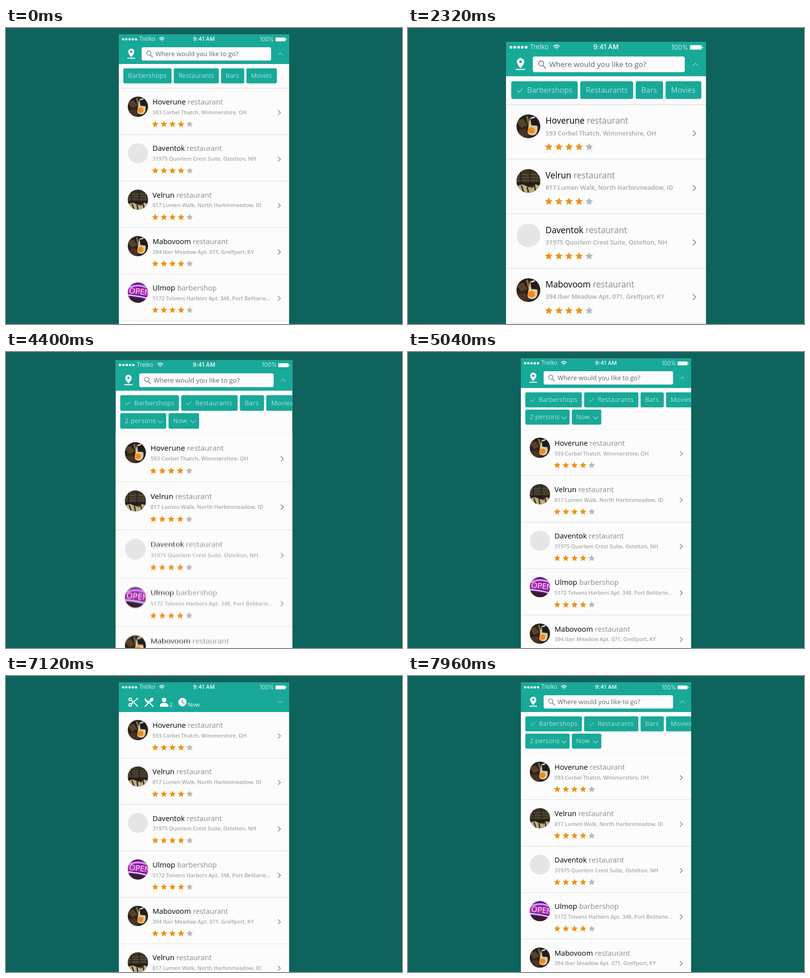
Recreate the animation shown at these times as an HTML page. Size 800 by 600 pixels, loop 8000 ms.

```html
<!DOCTYPE html>
<html lang="en">
<head>
<meta charset="utf-8">
<title>Place finder</title>
<style>
  html, body { margin: 0; height: 100%; overflow: hidden; background: #0e645c; }
  svg { display: block; width: 100vw; height: 100vh; }
  text { font-family: "Open Sans", "Noto Sans", sans-serif; }
  .bar { font: 300 11px Inter, "Open Sans", sans-serif; fill: #fff; letter-spacing: .2px; }
  .title { font-size: 14.67px; fill: #000; }
  .title tspan { fill: #8b8b8b; }
  .addr { font-size: 10.7px; font-weight: 600; fill: #a8a8a8; }
  .chip { font-size: 12.84px; font-weight: 300; fill: #fff; letter-spacing: .35px; }
  .line { fill: none; stroke-linecap: round; stroke-linejoin: round; }
</style>
</head>
<body>
<svg viewBox="0 0 800 600">
  <defs>
    <clipPath id="phoneClip"><rect x="228" y="13.5" width="344" height="620"/></clipPath>
    <clipPath id="headClip"><rect x="228" y="13.5" width="344" height="59.5"/></clipPath>
    <clipPath id="round"><circle r="20.5"/></clipPath>
    <filter id="soft" x="-20%" y="-20%" width="140%" height="140%"><feGaussianBlur stdDeviation=".9"/></filter>
    <g id="food">
      <rect x="-21" y="-21" width="42" height="42" fill="#28211c"/>
      <path d="M-21-9L-9-13-1-2-12 3z" fill="#5a4029"/>
      <path d="M-21 8L-6 4 2 17-8 21z" fill="#4a3322"/>
      <path d="M-4-17l3-1 4 14-3 2z" fill="#8a6a45"/>
      <path d="M3-15c7-3 11 5 12 13 2 8 0 15-5 17-8 2-13-2-11-9z" fill="#dcc79c"/>
      <path d="M3-17h12l1 16-11-1z" fill="#1d1d20"/>
      <path d="M4-14l7-2" stroke="#e8e2d4" stroke-width="2.5"/>
      <ellipse cx="5" cy="7" rx="6" ry="5.5" fill="#f08a1c"/>
    </g>
    <g id="bar">
      <rect x="-21" y="-21" width="42" height="42" fill="#3b3327"/>
      <path d="M-17-11h35M-18-6h36M-19-1h37" stroke="#776a50" stroke-width="1.3" stroke-dasharray="3 1.5"/>
      <path d="M-21 3h42v7h-42z" fill="#211c16"/>
      <path d="M-13-20v27M3-20v23" stroke="#272119" stroke-width="2"/>
      <path d="M-21 9L-10 6 2 11 13 6 21 9V21h-42z" fill="#c0ad83"/>
      <path d="M-12 8l4 12M-2 10l2 10M5 12l5-5 3 13" stroke="#332a1d" stroke-width="2.5" fill="none"/>
    </g>
    <g id="plain"><circle r="20.5" fill="#e6e6e6"/></g>
    <g id="neon">
      <rect x="-21" y="-21" width="42" height="42" fill="#5b1d92"/>
      <path d="M-21-9Q0-19 21-9" stroke="#e08af0" stroke-width="4" fill="none"/>
      <path d="M-21-6Q0-13 21-6V8Q0 2-21 2z" fill="#b32fb0"/>
      <path d="M-21 5Q0 6 21 12" stroke="#f0d8ff" stroke-width="2.5" fill="none"/>
      <path d="M-21 9Q0 10 21 16V21h-42z" fill="#3b1c22"/>
      <text x="-18" y="3" font-size="16" fill="#ffe6fa" transform="rotate(6)">OPEN</text>
    </g>
  </defs>
  <rect width="800" height="600" fill="#0e645c"/>
  <g id="scene">
    <g clip-path="url(#phoneClip)">
      <rect x="228" y="13" width="344" height="630" fill="#fcfcfc"/>
      <g id="rows"></g>
      <rect id="edge" x="228" width="344" height="1.1"/>
      <g id="panel"></g>
      <rect x="228" y="13" width="344" height="60" fill="#18a999"/>
      <g clip-path="url(#headClip)">
        <g id="search">
          <path d="M253 41.8a6.3 6.3 0 0 0-6.3 6.3c0 4.6 6.3 11 6.3 11s6.3-6.4 6.3-11a6.3 6.3 0 0 0-6.3-6.3zm0 4a2.3 2.3 0 1 1 0 4.6a2.3 2.3 0 0 1 0-4.6z" fill="#fff"/>
          <rect x="245" y="60.3" width="16" height="1.9" fill="#fff"/>
          <rect x="274" y="39" width="261.5" height="27" rx="3.5" fill="#fcfcfc"/>
          <path class="line" d="M292 55l4 4" stroke="#777" stroke-width="1.5"/>
          <circle cx="288.5" cy="51" r="4.3" fill="none" stroke="#777" stroke-width="1.3"/>
          <text x="302" y="57" font-size="12.84" fill="#666">Where would you like to go?</text>
        </g>
        <g id="icons" fill="#fff">
          <g>
            <g class="line" stroke="#fff" stroke-width="2">
              <circle cx="251" cy="47.5" r="2.7"/><circle cx="251" cy="58.5" r="2.7"/>
              <path d="M253.5 49.5L266 61.5M253.5 56.5L266 45"/>
            </g>
          </g>
          <g>
            <path class="line" d="M281 61.5L292 50.5M297 61.5L286 50.5" stroke="#fff" stroke-width="2.3"/>
            <ellipse cx="293.8" cy="48.3" rx="3.3" ry="4.8" transform="rotate(45 293.8 48.3)"/>
            <path d="M280.5 44.5l9 8.5-3 2.5q-8-5-6-11z"/>
          </g>
          <g>
            <circle cx="319.5" cy="48.5" r="4.6"/>
            <path d="M311 62.3v-2.5c0-4 5-5.3 8.5-5.3s8.5 1.3 8.5 5.3v2.5z"/>
            <text x="330" y="62" font-size="11">2</text>
          </g>
          <g>
            <circle cx="356.5" cy="53" r="8.4"/>
            <path class="line" d="M356 48.3v5l3.8 2.4" stroke="#18a999" stroke-width="1.5"/>
            <text x="367.5" y="62" font-size="11.3">Now</text>
          </g>
        </g>
      </g>
      <path id="arrow" class="line" d="M-4.5-2.2L0 2.2 4.5-2.2" stroke="#8ad6cd" stroke-width="1.1"/>
      <g id="dots" fill="#fff"></g>
      <text class="bar" x="269" y="26.3">Trelko</text>
      <g class="line" stroke="#fff" stroke-width="1.5">
        <path d="M309.8 21.2q5-4.2 10 0M311.8 23.7q3-2.5 6 0"/>
        <circle cx="314.8" cy="25.6" r=".6" fill="#fff" stroke-width=".8"/>
      </g>
      <text class="bar" x="400" y="26.3" text-anchor="middle" style="font-weight:500">9:41 AM</text>
      <text class="bar" x="541.5" y="26.8" text-anchor="end">100%</text>
      <rect x="544.5" y="19.3" width="20" height="7.8" rx="1.5" fill="#fff"/>
      <rect x="565.3" y="21.7" width="1.4" height="3" rx=".6" fill="#fff"/>
    </g>
    <circle id="finger" r="23" fill="#484848" filter="url(#soft)"/>
  </g>
</svg>
<script>
const $ = id => document.getElementById(id);
const LOOP = 8000, PITCH = 94.2, ORIGIN = { x: 400, y: -69 };

const clamp = v => Math.max(0, Math.min(1, v));
const ease = (t, start, len) => {
  const p = clamp((t - start) / len);
  return p * p * (3 - 2 * p);
};
const mix = (a, b, p) => a + (b - a) * p;
const mixRgb = (a, b, p) => `rgb(${a.map((v, i) => Math.round(mix(v, b[i], p)))})`;

// Motion curves
const zoom = t => 1 + .1744 * (ease(t, 1040, 360) - ease(t, 4150, 360));
const barbers = t => ease(t, 1640, 260);
const diners = t => ease(t, 2840, 260);
const swapA = t => ease(t, 1760, 400);
const swapB = t => ease(t, 2960, 400);
const extra = t => ease(t, 3450, 350);
const open = t => 1 - ease(t, 5250, 320) + ease(t, 7350, 320);
const listTop = t => 72 + open(t) * (50 + 34.5 * extra(t));

const places = [
  { name: "Hoverune", kind: "restaurant", addr: "593 Corbel Thatch, Wimmershire, OH", pic: "food", slot: () => 0 },
  { name: "Daventok", kind: "restaurant", addr: "31975 Quorlem Crest Suite, Ostelton, NH", pic: "plain", slot: t => 1 + swapA(t) },
  { name: "Velrun", kind: "restaurant", addr: "817 Lumen Walk, North Harbinmeadow, ID", pic: "bar", slot: t => 2 - swapA(t) },
  { name: "Mabovoom", kind: "restaurant", addr: "394 Iber Meadow Apt. 071, Grelfport, KY", pic: "food", slot: t => 3 + swapB(t) },
  { name: "Ulmop", kind: "barbershop", addr: "5172 Tolvens Harbors Apt. 348, Port Belitarie...", pic: "neon", slot: t => 4 - swapB(t) },
  { name: "Velrun", kind: "restaurant", addr: "817 Lumen Walk, North Harbinmeadow, ID", pic: "bar", slot: () => 5 }
];

const star = Array.from({ length: 10 }, (_, i) => {
  const r = i % 2 ? 3.3 : 7, a = i * Math.PI / 5;
  return `${(r * Math.sin(a)).toFixed(2)},${(-r * Math.cos(a)).toFixed(2)}`;
}).join(" ");
const stars = [0, 1, 2, 3, 4].map(i =>
  `<polygon points="${star}" transform="translate(${301.5 + 17.4 * i} 73.2)" fill="${i < 4 ? "#ee9318" : "#b9b9b9"}"/>`).join("");

$("rows").innerHTML = places.map((p, i) => `
  <filter id="smear${i}" x="-2%" y="-10%" width="104%" height="120%"><feGaussianBlur/></filter>
  <g class="row">
    <rect x="228" y=".6" width="344" height="${PITCH - .6}" fill="#fcfcfc"/>
    <g transform="translate(266.5 37.5)" clip-path="url(#round)"><use href="#${p.pic}"/></g>
    <text class="title" x="296" y="33.3">${p.name} <tspan>${p.kind}</tspan></text>
    <text class="addr" x="296" y="53">${p.addr}</text>
    ${stars}
    <path class="line" d="M549.8 45l4.6 4.5-4.6 4.5" stroke="#8c8c8c" stroke-width="1.5"/>
    <rect x="228" y="${PITCH - .5}" width="344" height="1.1" fill="#dedede"/>
  </g>`).join("");
const rows = [...document.querySelectorAll(".row")];
const smears = [...document.querySelectorAll("#rows feGaussianBlur")];

const chips = [
  { label: "Barbershops", w: 97.5, grow: 16.8, on: barbers },
  { label: "Restaurants", w: 91, grow: 18.7, on: diners },
  { label: "Bars", w: 47, grow: 0, on: () => 0 },
  { label: "Movies", w: 61.5, grow: 0, on: () => 0 }
];
const menus = [{ label: "2 persons", x: 237, w: 89.5 }, { label: "Now", x: 331, w: 59.5 }];

$("panel").innerHTML = chips.map(c => `
  <g class="tag" fill="#18a999"><rect y="81.8" width="${c.w}" height="30.4" rx="3"/>
    <path class="line" d="M10.5 97.5l3 3 6-6.5" stroke="#fff" stroke-width="1"/>
    <text class="chip" y="101.2">${c.label}</text></g>`).join("") +
  `<g id="menus">` + menus.map(m => `
  <g transform="translate(${m.x})"><rect y="116.8" width="${m.w}" height="30.4" rx="3"/>
    <text class="chip" x="9" y="136.2">${m.label}</text>
    <path class="line" d="M${m.w - 16} 131.5l4.5 4.3 4.5-4.3" stroke="#a5e2db" stroke-width="1.1"/></g>`).join("") + `</g>`;
const tags = [...document.querySelectorAll(".tag")];

$("dots").innerHTML = [0, 1, 2, 3, 4].map(i => `<circle cx="${236.6 + 6.5 * i}" cy="23" r="2.4"/>`).join("");

const dragY = t => 294 + 84.5 * open(t);
const touches = [
  { from: 1480, to: 1780, x: 286, y: () => 97 },
  { from: 2680, to: 2980, x: 400, y: () => 97 },
  { from: 5080, to: 5720, x: 395, y: dragY },
  { from: 7200, to: 7840, x: 395, y: dragY }
];

// Rows smear vertically with the speed of the zoom
function drawRows(t) {
  const dz = Math.abs(zoom(t) - zoom(t - 10));
  places.forEach((p, i) => {
    const y = listTop(t) + p.slot(t) * PITCH;
    const blur = .3 * dz * (y + 40 - ORIGIN.y);
    rows[i].setAttribute("transform", `translate(0 ${y})`);
    smears[i].setAttribute("stdDeviation", `0 ${blur.toFixed(2)}`);
    if (blur > .15) rows[i].setAttribute("filter", `url(#smear${i})`);
    else rows[i].removeAttribute("filter");
  });
}

function drawPanel(t, o, e) {
  $("edge").setAttribute("y", listTop(t) - .5);
  $("edge").setAttribute("fill", mixRgb([220, 220, 220], [241, 241, 241], e));
  $("panel").setAttribute("transform", `translate(0 ${(o - 1) * 84.5})`);
  let x = 237;
  chips.forEach((c, i) => {
    const on = c.on(t), w = c.w + c.grow * on, [box, tick, label] = tags[i].children;
    tags[i].setAttribute("transform", `translate(${x})`);
    box.setAttribute("width", w);
    tick.setAttribute("opacity", .65 * on);
    label.setAttribute("x", 9.5 + 18 * on);
    x += w + 4.4;
  });
  $("menus").setAttribute("fill", mixRgb([150, 245, 236], [24, 169, 153], o));
  $("menus").setAttribute("opacity", e);
  $("menus").setAttribute("transform", `translate(0 ${(e - 1) * 15})`);
}

function drawHeader(o) {
  $("search").setAttribute("transform", `translate(0 ${(o - 1) * 52})`);
  $("search").setAttribute("opacity", clamp(o * 1.8 - .6));
  $("icons").setAttribute("opacity", clamp(1 - o * 1.1));
  [...$("icons").children].forEach((g, i) =>
    g.setAttribute("transform", `translate(0 ${o * (30 + 9 * i)})`));
  $("arrow").setAttribute("transform", `translate(554 52.5) rotate(${-180 * o})`);
}

function drawFinger(t) {
  const f = touches.find(f => t >= f.from && t <= f.to);
  $("finger").setAttribute("opacity", 0);
  if (!f) return;
  const show = Math.min(ease(t, f.from, 120), 1 - ease(t, f.to - 140, 140));
  $("finger").setAttribute("opacity", .74 * show);
  $("finger").setAttribute("transform", `translate(${f.x} ${f.y(t)}) scale(${1.25 - .25 * show})`);
}

function draw(t) {
  const z = zoom(t), o = open(t);
  $("scene").setAttribute("transform", `translate(${ORIGIN.x * (1 - z)} ${ORIGIN.y * (1 - z)}) scale(${z})`);
  drawRows(t);
  drawPanel(t, o, extra(t));
  drawHeader(o);
  drawFinger(t);
}

const start = performance.now();
function tick() {
  draw((performance.now() - start) % LOOP);
  requestAnimationFrame(tick);
}
tick();
</script>
</body>
</html>
```
